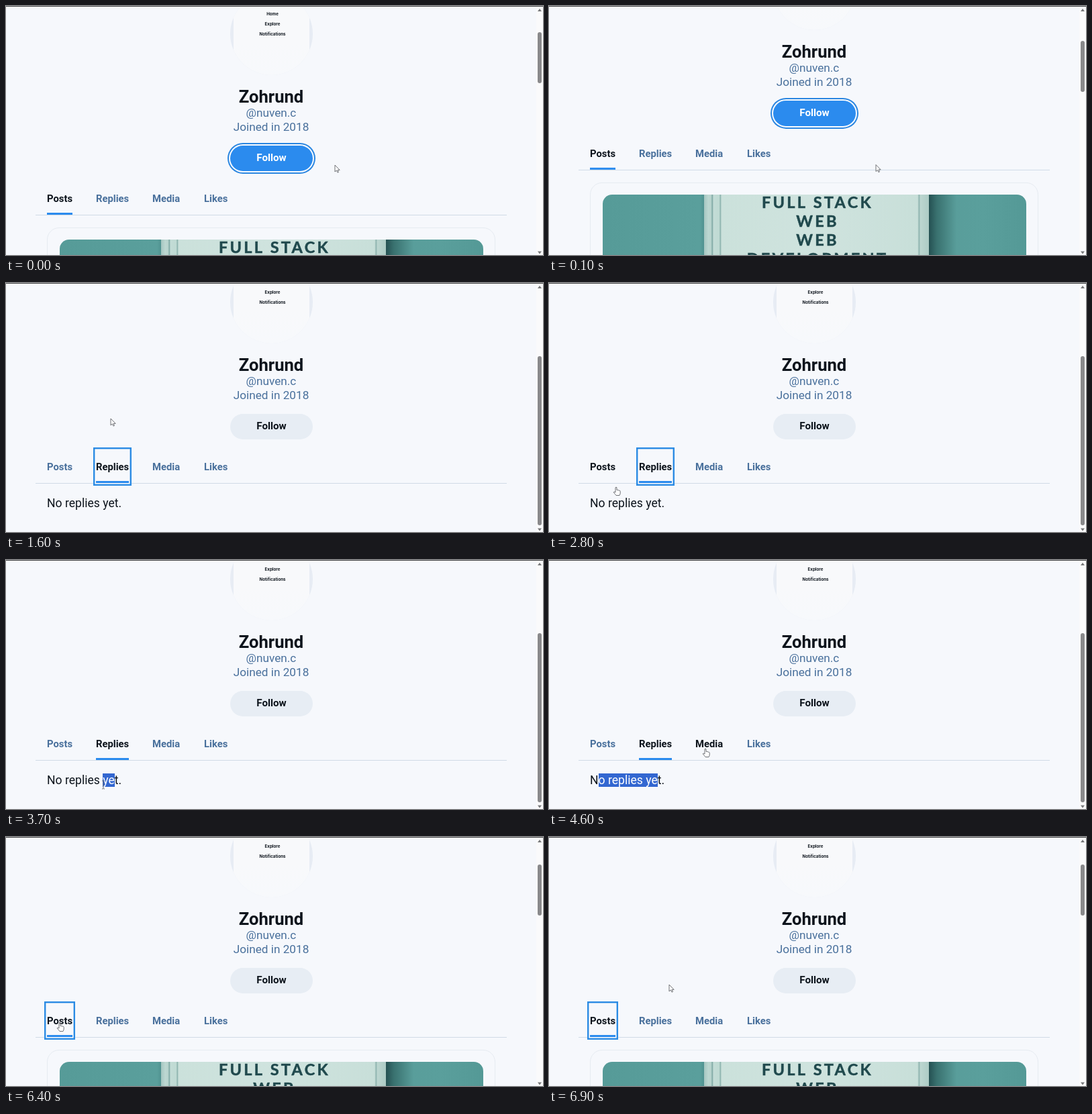
An HTML page for the animation above (7000 ms loop, 800 by 371 pixels).

```html
<!DOCTYPE html>
<html lang="en">
<head>
<meta charset="utf-8">
<style>
html, body { margin: 0; width: 100%; height: 100%; overflow: hidden; }
body { position: relative; background: #f6f8fc; color: #0d141c; font-family: Roboto, sans-serif; }
div, svg { position: absolute; box-sizing: border-box; }
.text { line-height: 24px; white-space: pre; }
.center { left: 195px; width: 400px; text-align: center; }
.soft { color: #49709c; font-size: 17.2px; }
#page { inset: 0; }
#avatar { left: 334px; top: -20px; width: 123px; height: 123px; border-radius: 50%; overflow: hidden; background: #e7ecf4; }
#avatar div { left: 5px; width: 113px; height: 123px; background: linear-gradient(#f8f9fb 60%, #f7f9fc); }
.tiny { left: 197px; font: 700 6.2px/24px Inter, sans-serif; }
#follow { left: 334px; top: 208px; width: 123px; height: 37.5px; border-radius: 19px; background: #e7edf4;
  font-weight: 700; font-size: 15.2px; line-height: 37px; text-align: center; }
#follow.on { background: #2b8bee; color: #fff; box-shadow: 0 0 0 2px #f8fbff, 0 0 0 4px #2b86e0; }
#rule { left: 44px; top: 311px; width: 702px; height: 1px; background: #d0dbe6; }
.tab { top: 262px; height: 49px; line-height: 50px; font-weight: 700; font-size: 14.8px; color: #49709c; }
.tab.dark { color: #0d141c; }
.tab.active { border-bottom: 3px solid #2b8bee; }
.tab.ring { box-shadow: 0 0 0 1.6px #f6f8fc, 0 0 0 4px #2b8be4; }
#empty { left: 61px; top: 329px; font-size: 17.6px; }
#empty span { background: #3367d1; color: #fff; }
#card { left: 61px; top: 329.5px; width: 668px; height: 300px; border: 1px solid #e6ebf1; border-radius: 18px; }
#cover { left: 18px; top: 17px; width: 631px; height: 260px; border-radius: 14px; overflow: hidden;
  background: linear-gradient(90deg, #569b98, #5a9f9c 23%, #4f918f 24%, #5a9f9c 90%, #549996); }
#shade { left: 485px; width: 42px; height: 260px; background: linear-gradient(90deg, #234e50, #39716f 30%, #5a9f9c00); }
#book { left: 151px; width: 335px; height: 260px;
  background: linear-gradient(90deg, #a5c6c1, #bdd8d2 2%, #b5d2cc 3.2%, #78a39f 3.6%, #c3dcd6 4.2%, #bfdad3 6.8%,
    #86aea9 7.2%, #cbe1db 7.8%, #cfe3de 50%, #c8dfd9 95%, #8db3ae 95.6%, #bcd6d0 96.2%, #adcbc5); }
.title { left: 0; width: 338px; text-align: center; font: 700 23.5px/28px Lato, sans-serif; letter-spacing: 3.3px;
  color: #20494d; -webkit-text-stroke: .5px; white-space: pre; }
#topline { left: 0; top: 0; width: 100%; height: 1.4px; background: #454647; }
#bar { right: 0; top: 1px; width: 10px; bottom: 0; background: #fafafb; }
#thumb { left: 792px; width: 6px; border-radius: 3px; background: #89898b; }
#pointer { left: 0; top: 0; width: 14px; height: 18px; overflow: visible; }
#pointer path { fill: #fff; stroke: #606268; stroke-width: .9; stroke-linejoin: round; }
</style>
</head>
<body>
<div id="page">
  <div id="avatar"><div></div></div>
  <div class="text center tiny" style="top:0">Home</div>
  <div class="text center tiny" style="top:15px">Explore</div>
  <div class="text center tiny" style="top:30px">Notifications</div>
  <div class="text center" style="top:122.6px;font-weight:700;font-size:25.6px">Zohrund</div>
  <div class="text center soft" style="top:147px">@nuven.c</div>
  <div class="text center soft" style="top:168px">Joined in 2018</div>
  <div id="follow">Follow</div>
  <div id="rule"></div>
  <div class="tab" style="left:61px;width:38px">Posts</div>
  <div class="tab" style="left:134px;width:49px">Replies</div>
  <div class="tab" style="left:218px;width:42px">Media</div>
  <div class="tab" style="left:295px;width:35px">Likes</div>
  <div id="empty" class="text"></div>
  <div id="card"><div id="cover">
    <div id="shade"></div>
    <div id="book"><div class="title" style="top:-3px">FULL STACK
WEB
WEB
DEVELOPMENT</div></div>
  </div></div>
</div>
<div id="topline"></div>
<div id="bar"></div>
<svg width="800" height="371" style="left:0;top:0" fill="#77787a"><path d="M792 8h6l-3-4zM792 365.500h6l-3 4z"/></svg>
<div id="thumb"></div>
<svg id="pointer"><path/></svg>
<script>
const LOOP = 7000, STEP = 100;
const $ = id => document.getElementById(id);
const tabs = [...document.querySelectorAll('.tab')];
const messages = ['', 'No replies yet.', 'No media shared yet.', 'No likes yet.'];

// [time, selected tab]
const clicks = [[0, 0], [1200, 1], [4800, 2], [5700, 3], [6300, 0]];
const SELECT_START = 3600, SELECT_END = 4100;

const shapes = {
  arrow: 'M0 0V10L2.400 7.900L4 11.200L5.500 10.500L4 7.400H7.200Z',
  text: 'M-2-6H-.600L0-5.400L.600-6H2M0-5.400V5.400M-2 6H-.600L0 5.400L.600 6H2',
  hand: 'M-1 7V.800Q0-.600 1 .800V4.500Q2 3.700 2.900 4.800Q4 4.200 4.700 5.300Q6 5 6.200 6.300V9Q6 11 5 12.500H0Q-1.500 10.500-3.800 7.800Q-3.500 6-1 8Z'
};

// [time, x, y, pointer shape or hovered tab]
const path = [
  [0, 490, 237, 'arrow'], [200, 484, 236, 'arrow'], [800, 194, 215, 'arrow'],
  [900, 174, 207, 1], [1000, 156, 202, 1], [1200, 156, 202, 'arrow'], [1900, 156, 202, 'arrow'],
  [2200, 166, 326, 'text'], [2400, 166, 326, 'text'], [2600, 84, 274, 0],
  [2700, 88, 284, 0], [2800, 100, 304, 0], [3000, 82, 326, 'text'],
  [3100, 82, 326, 'text'], [3400, 163, 336, 'text'], [SELECT_START, 163, 336, 'text'],
  [SELECT_END, 73, 331, 'text'], [4200, 73, 331, 'text'], [4300, 115, 316, 'arrow'],
  [4500, 233, 281, 2], [5200, 233, 281, 2], [5300, 265, 281, 'arrow'],
  [5500, 327, 281, 3], [5700, 327, 281, 3], [5900, 344, 283, 'arrow'],
  [6200, 80, 277, 0], [6400, 80, 277, 0], [6500, 115, 258, 'arrow'],
  [6700, 179, 220, 'arrow'], [LOOP, 179, 220, 'arrow']
];

const ramp = (t, from, to) => Math.min(1, Math.max(0, (t - from) / (to - from)));
const lastBefore = (list, t) => list.findLastIndex(k => k[0] <= t);

function pointerAt(t) {
  const i = lastBefore(path, t), a = path[i], b = path[i + 1];
  const p = ramp(t, a[0], b[0]);
  return { x: a[1] + (b[1] - a[1]) * p, y: a[2] + (b[2] - a[2]) * p, kind: a[3] };
}

// One wheel notch at the start; the shorter page then limits the scroll.
function scrollAt(t) {
  if (t >= 1200) return 13;
  return 89.5 * (1 - (1 - ramp(t, 0, 200)) ** 2);
}

function render(t) {
  const [clicked, tab] = clicks[lastBefore(clicks, t)];
  const scroll = scrollAt(t), pointer = pointerAt(t);
  const selecting = tab === 1 && t >= SELECT_START;
  $('page').style.transform = `translateY(${-scroll}px)`;
  $('follow').className = t < 1200 ? 'on' : '';

  tabs.forEach((el, i) => {
    el.classList.toggle('dark', i === tab || i === pointer.kind);
    el.classList.toggle('active', i === tab);
    el.classList.toggle('ring', i === tab && clicked > 0 && !selecting);
  });

  const message = messages[tab];
  const start = selecting ? Math.round(13 - 12 * ramp(t, SELECT_START, SELECT_END)) : 13;
  $('empty').innerHTML = `${message.slice(0, start)}<span>${message.slice(start, 13)}</span>${message.slice(13)}`;
  $('card').style.display = tab ? 'none' : '';

  $('thumb').style.top = (tab ? 109 : 38.7 + scroll * 0.205) + 'px';
  $('thumb').style.height = (tab ? 252 : 76) + 'px';

  const shape = $('pointer').firstElementChild;
  shape.setAttribute('d', shapes[pointer.kind] || shapes.hand);
  $('pointer').style.transform = `translate(${pointer.x}px, ${pointer.y}px)`;
}

function tick() {
  const t = performance.now() % LOOP;
  render(Math.floor(t / STEP) * STEP);
  requestAnimationFrame(tick);
}
tick();
</script>
</body>
</html>
```
